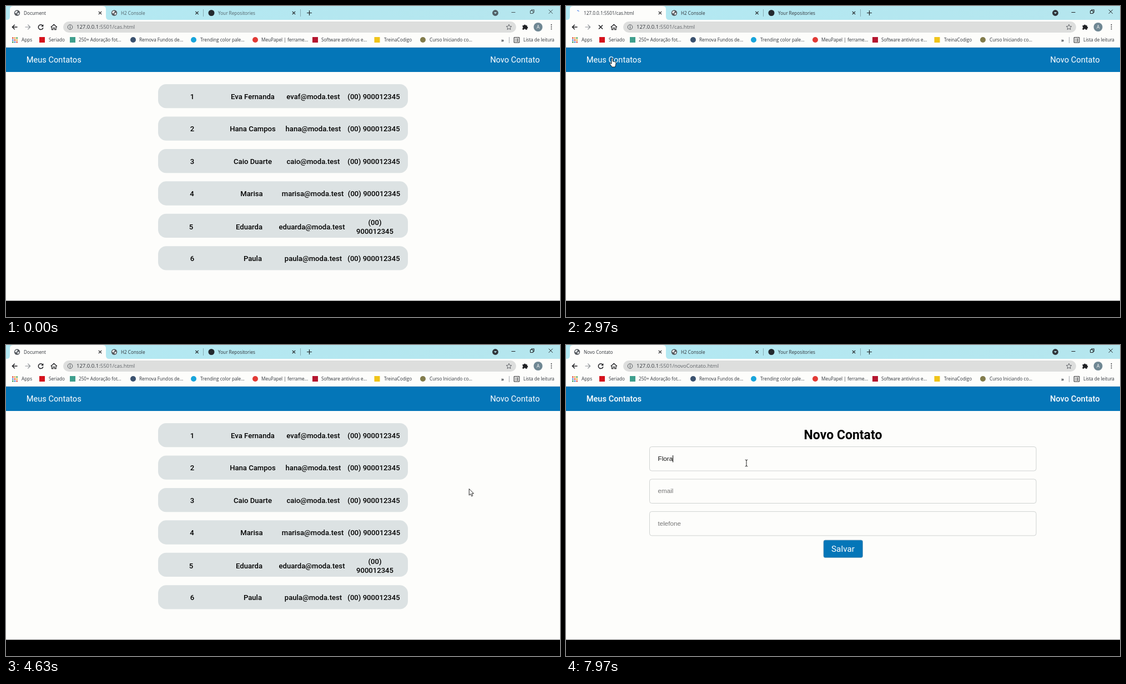
An HTML page that plays this animation: 998 px wide and 561 px high, repeating every 8000 ms.

```html
<!DOCTYPE html>
<html lang="pt-BR">
<head>
<meta charset="utf-8">
<title>Contatos</title>
<style>
  html, body { margin: 0; width: 100%; height: 100%; overflow: hidden; background: #000; }
  svg { display: block; width: 100%; height: 100%; }
  .ui { font: 8.2px "Open Sans", "Noto Sans", sans-serif; fill: #30343a; }
  .page { font-family: Roboto, sans-serif; }
  .nav { font-size: 14.65px; fill: #fff; }
  .row text { font-size: 13.1px; font-weight: 500; text-anchor: middle; }
  .field { font: 11.7px "Liberation Sans", Arial, sans-serif; fill: #757575; }
  .line { fill: none; stroke: #202124; stroke-width: 1.2; }
  .cursor { fill: #fff; stroke: #111; stroke-width: .9; stroke-linejoin: round; }
</style>
</head>
<body>
<svg viewBox="0 0 998 561" xmlns="http://www.w3.org/2000/svg">
  <defs>
    <linearGradient id="sky">
      <stop offset="0" stop-color="#b3e9f3"/><stop offset="1" stop-color="#b5e6ee"/>
    </linearGradient>
    <g id="globe">
      <circle r="5.2" fill="#55595e"/>
      <path d="M-3.8-1.5Q-2-4 .5-3.6L1-1.8-1-.6-.6 1-3.4.6ZM1 .2 3.8-.6Q4 2.4 1.4 3.7L.2 2Z" fill="#eef1f2"/>
    </g>
    <path id="close" d="M-2.7-2.7 2.7 2.7M2.7-2.7-2.7 2.7" class="line"/>
  </defs>

  <rect width="998" height="561" fill="#fdfdfb"/>
  <rect width="998" height="25" fill="url(#sky)"/>
  <path d="M1 25Q7 25 7 19V6Q7 0 13 0H174Q180 0 180 6V19Q180 25 186 25Z" fill="#fdfdfb"/>
  <path d="M0 74.5H998" stroke="#dfe1e4"/>

  <g class="ui">
    <use id="favicon" href="#globe" x="20" y="12.5"/>
    <path id="spinner" d="M20 8A4.5 4.5 0 0 1 23.5 9.7" fill="none" stroke="#3b78e7"/>
    <text id="tabTitle" x="32" y="15.5"></text>
    <use href="#close" x="169.5" y="12.5"/>
    <use href="#globe" x="195" y="12.5"/>
    <use href="#close" x="344" y="12.5"/>
    <circle cx="370" cy="12.5" r="5.5" fill="#24292e"/>
    <use href="#close" x="518.5" y="12.5"/>
    <path d="M355.5 6V19M530.5 6V19" stroke="#86aab2"/>
    <path d="M546.5 8V17M542 12.5H551" class="line"/>
    <g id="chrome">
      <text x="207" y="15.5">H2 Console</text>
      <text x="382" y="15.5">Your Repositories</text>
      <circle cx="881.5" cy="12.5" r="5.4"/>
      <path d="M878.8 11.2H884.2L881.5 14.3Z" fill="#b5e6ee"/>
      <path d="M910.5 11.5H917.5M944.5 8.5H949.5V13.5H944.5ZM946.5 8.5V6.8H951.3V11.7H949.5M977.7 6.7 984.8 13.8M984.8 6.7 977.7 13.8" class="line" style="stroke-width:1"/>
    </g>

    <path d="M20.5 38H11.5M15.7 33.7 11.4 38 15.7 42.3" class="line" style="stroke-width:1.5"/>
    <path d="M34.5 38H43.5M39.3 33.7 43.6 38 39.3 42.3" class="line" style="stroke:#8c9094"/>
    <g id="reload">
      <path d="M66 35.5A4.3 4.3 0 1 0 66.8 39.2" class="line" style="stroke-width:1.5"/>
      <path d="M67.4 33V37.2H63.2Z" fill="#202124"/>
    </g>
    <path id="stop" d="M59 34.5 66 41.5M66 34.5 59 41.5" class="line" style="stroke-width:1.5"/>
    <path d="M80.7 38.3 86.3 33.2 91.9 38.3M82.5 37.5V42.7H85V39.5H87.6V42.7H90.1V37.5" class="line"/>
    <rect x="103" y="28" width="816" height="20" rx="10" fill="#dddedd"/>
    <circle cx="115.5" cy="38" r="4.3" class="line" style="stroke:#55595e;stroke-width:1"/>
    <path d="M115.5 37.3V40.6M115.5 35.3V36.4" class="line" style="stroke:#55595e"/>
    <text x="127" y="41.4" style="font-size:9.5px">127.0.0.1<tspan id="path" fill="#5f6368"></tspan></text>
    <path d="M906 33.3 907.4 36.5 910.8 36.8 908.2 39.1 909 42.5 906 40.7 903 42.5 903.8 39.1 901.2 36.8 904.6 36.5Z" class="line" style="stroke:#55595e;stroke-width:.9"/>
    <path d="M930.5 35H933A1.6 1.6 0 0 1 936.2 35H938.7V37.3A1.6 1.6 0 0 1 938.7 40.5V42.8H936A1.5 1.5 0 0 0 933 42.8H930.5V40A1.5 1.5 0 0 0 930.5 37.2Z" fill="#202124"/>
    <circle cx="958.5" cy="38" r="8" fill="#6f8793"/>
    <text x="958.5" y="41.2" text-anchor="middle" fill="#fff">A</text>
    <path d="M982.5 34V42.5" stroke="#202124" stroke-width="1.9" stroke-linecap="round" stroke-dasharray="0 3.7"/>
    <g id="bookmarks"></g>
    <text x="892" y="64.5" font-weight="700">»</text>
    <path d="M906.5 56V67" stroke="#a9adb1"/>
    <path d="M915.2 56.7H924.8V66H915.2ZM917 59.3H918.2M919.5 59.3H923M917 61.5H918.2M919.5 61.5H923M917 63.7H918.2M919.5 63.7H923" class="line" style="stroke-width:1"/>
    <text x="932" y="64.3">Lista de leitura</text>
  </g>

  <g class="page">
    <rect y="75" width="998" height="44" fill="#0476b8"/>
    <g id="nav" class="nav">
      <text x="36.7" y="102.2">Meus Contatos</text>
      <text x="961.5" y="102.2" text-anchor="end">Novo Contato</text>
    </g>
    <g id="list"></g>
    <g id="form">
      <text x="499" y="170" font-size="23" font-weight="700" text-anchor="middle">Novo Contato</text>
      <g fill="#fdfdfb" stroke="#d0d3d2">
        <rect x="150.5" y="183.5" width="696.5" height="43.5" rx="4"/>
        <rect x="150.5" y="242" width="696.5" height="43.5" rx="4"/>
        <rect x="150.5" y="300.4" width="696.5" height="43.5" rx="4"/>
      </g>
      <g class="field">
        <text id="nameField" x="165.5" y="209"></text>
        <text x="165.5" y="267.4">email</text>
        <text x="165.5" y="325.9">telefone</text>
      </g>
      <rect id="caret" y="199" width="1" height="12.5"/>
      <rect x="464" y="352" width="70.5" height="31.5" rx="3" fill="#0476b8" stroke="#6f9bb8" stroke-width=".8"/>
      <text x="499" y="373" font-size="15.3" fill="#fff" text-anchor="middle">Salvar</text>
    </g>
  </g>

  <rect y="531.7" width="998" height="30"/>

  <g id="pointer" class="cursor">
    <path id="arrow" d="M0 0V11.6L2.7 9.2 4.6 13.4 6.5 12.5 4.7 8.5H8.3Z"/>
    <path id="hand" d="M0 1Q1.2-.7 2.4 1V5.8L6.8 6.9Q8.3 7.4 8.1 9L7.4 12.8 6.5 16H1L-2.9 10.6Q-3.7 8.7-2 8.7L0 10.2Z"/>
    <path id="beam" d="M-2.3-6Q0-6 0-4.6Q0-6 2.3-6M0-5V5M-2.3 6Q0 6 0 4.6Q0 6 2.3 6" fill="none"/>
  </g>
</svg>
<script>
const LOOP = 8000, HOVER_LAG = 180;
const $ = id => document.getElementById(id);
const show = (id, on) => $(id).style.display = on ? '' : 'none';

// Bookmarks: text x, label, icon x, icon colour, round icon?
const bookmarks = [
  [77, 'Seriado', 65, '#d5121c', false],
  [131, '250+ Adoração fot...', 120, '#3f9f8d', false],
  [240, 'Remova Fundos de...', 229, '#3b526f', true],
  [350, 'Trending color pale...', 338, '#18a5dc', true],
  [460, 'MeuPapel | ferrame...', 449, '#e23a35', true],
  [568, 'Software antivírus e...', 557, '#b5162f', false],
  [681, 'TreinaCodigo', 668.5, '#f0c419', false],
  [763, 'Curso Iniciando co...', 751, '#827c4c', true]
];
const appColors = ['#e04a3f', '#e8a62d', '#3f9b55', '#4285d6'];
let icons = '<text x="28" y="64.3">Apps</text>';
for (let i = 0; i < 9; i++) {
  icons += `<rect x="${11 + i % 3 * 3.7}" y="${56.5 + (i / 3 | 0) * 3.7}" width="2.5" height="2.5" fill="${appColors[i % 4]}"/>`;
}
$('bookmarks').innerHTML = icons + bookmarks.map(([x, label, cx, color, round]) =>
  `<rect x="${cx - 5}" y="56" width="10" height="10" rx="${round ? 5 : 0}" fill="${color}"/>
   <text x="${x}" y="64.3">${label}</text>`).join('');

// Contact rows
const ROW_TOP = 141, ROW_PITCH = 58.45, ROW_HEIGHT = 43.3;
const contacts = [
  ['Eva Fernanda', 'evaf'], ['Hana Campos', 'hana'], ['Caio Duarte', 'caio'],
  ['Marisa', 'marisa'], ['Eduarda', 'eduarda'], ['Paula', 'paula']
];
const columns = i => i === 4 ? [333.5, 438, 551, 664.5]
  : i === 3 ? [335, 442.5, 552.5, 663] : [335.5, 444.5, 553.5, 662.5];
$('list').innerHTML = contacts.map(([name, user], i) => {
  const top = ROW_TOP + i * ROW_PITCH, wrapped = i === 4;
  const base = top + 26.6 + (wrapped ? 1.2 : 0);
  const [a, b, c, d] = columns(i);
  const cell = (x, text, dy = 0) => `<text x="${x}" y="${base + dy}">${text}</text>`;
  const phone = wrapped ? cell(d, '(00)', -7.8) + cell(d, '900012345', 8.2) : cell(d, '(00) 900012345');
  return `<g class="row"><rect x="274" y="${top}" width="450" height="${ROW_HEIGHT}" rx="14.6"/>
    ${cell(a, i + 1)}${cell(b, name)}${cell(c, user + '@moda.test')}${phone}</g>`;
}).join('');
const rowBoxes = [...document.querySelectorAll('.row rect')];

// Pointer hotspot: time, x, y
const route = [
  [1750, 520, 531], [2080, 390, 330], [2450, 82, 94], [3400, 82, 94], [3690, 480, 165],
  [3870, 552, 351], [4080, 600, 505], [4170, 620, 505], [4400, 770, 350], [4630, 834, 260],
  [4930, 914, 94], [5870, 912, 96], [6230, 326, 236], [6330, 326, 248], [6480, 325, 213],
  [LOOP, 325, 213]
];
function pointerAt(t) {
  const i = Math.max(1, route.findIndex(p => p[0] > t));
  const [t0, x0, y0] = route[i - 1], [t1, x1, y1] = route[i];
  const k = Math.max(0, (t - t0) / (t1 - t0));
  return [x0 + (x1 - x0) * k, y0 + (y1 - y0) * k];
}
function rowAt([x, y]) {
  const i = Math.floor((y - ROW_TOP) / ROW_PITCH);
  const inside = x > 274 && x < 724 && y - ROW_TOP - i * ROW_PITCH < ROW_HEIGHT;
  return inside && i < contacts.length ? i : -1;
}

const FOCUS = 1950, RELOAD = [2850, 3150], OPEN_FORM = [5300, 5450], FIELD_CLICK = 6520;
const typed = 'Flora', keyTimes = [7000, 7350, 7650, 7800, 7930];
const within = (t, [a, b]) => t >= a && t < b;

function draw(t) {
  const loading = within(t, RELOAD) || within(t, OPEN_FORM);
  const onForm = t >= OPEN_FORM[0];
  const listShown = !onForm && !loading, formShown = onForm && !loading;
  const path = onForm ? ':5501/novoContato.html' : ':5501/cas.html';

  show('list', listShown);
  show('form', formShown);
  show('favicon', !loading);
  show('spinner', loading);
  show('reload', !loading);
  show('stop', loading);
  $('spinner').setAttribute('transform', `rotate(${(t - 2970) * .36} 20 12.5)`);
  $('path').textContent = path;
  $('tabTitle').textContent = loading ? '127.0.0.1' + path : onForm ? 'Novo Contato' : 'Document';
  $('chrome').style.opacity = t < FOCUS ? .75 : 1;
  $('nav').style.fontWeight = formShown ? 500 : 400;

  const [x, y] = pointerAt(t);
  const overLink = y > 85 && y < 110 && (x > 36 && x < 136 || x > 871 && x < 962);
  const overField = formShown && y > 183 && y < 227 && x > 150 && x < 847;
  const overRow = listShown && rowAt([x, y]) >= 0;
  const shape = overField ? 'beam' : overLink || overRow ? 'hand' : 'arrow';
  show('pointer', t >= route[0][0]);
  for (const id of ['arrow', 'hand', 'beam']) show(id, id === shape);
  $('pointer').setAttribute('transform', `translate(${x} ${y})`);

  const hovered = t - HOVER_LAG >= route[0][0] ? rowAt(pointerAt(t - HOVER_LAG)) : -1;
  rowBoxes.forEach((box, i) => box.setAttribute('fill', i === hovered ? '#ced3d8' : '#dce2e3'));

  const count = keyTimes.filter(k => k <= t).length;
  const field = $('nameField');
  field.textContent = count ? typed.slice(0, count) : 'nome';
  field.style.fill = count ? '#111' : '';
  const lastKey = count ? keyTimes[count - 1] : FIELD_CLICK;
  show('caret', t >= FIELD_CLICK && (t - lastKey) % 1060 < 530);
  $('caret').setAttribute('x', 165.5 + (count ? field.getComputedTextLength() : 0));
}

const start = performance.now();
function tick() {
  draw((performance.now() - start) % LOOP);
  requestAnimationFrame(tick);
}
tick();
</script>
</body>
</html>
```
